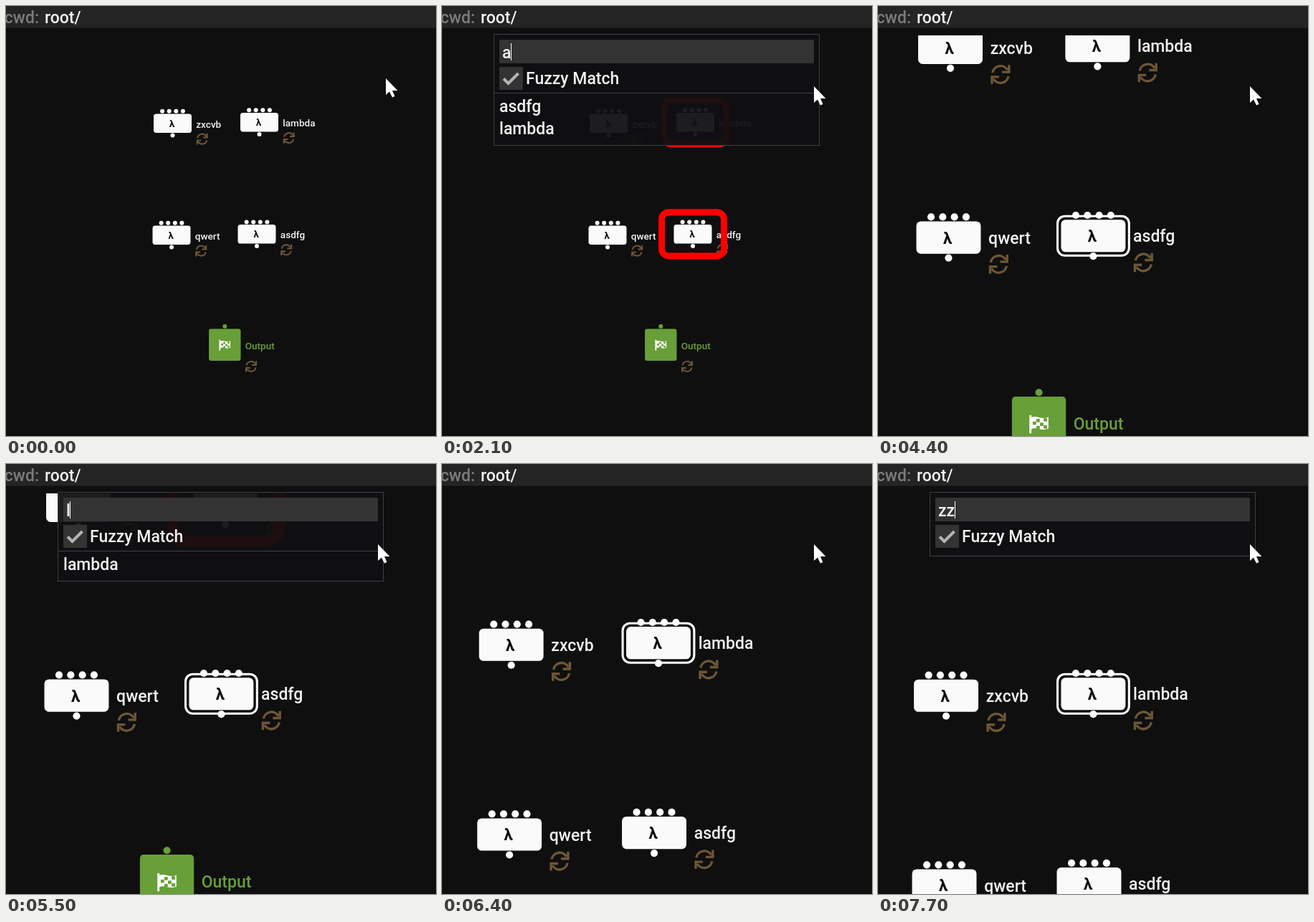
These frames come from a looping animation (600 px wide and 600 px high, 8 s). An HTML page:

```html
<!DOCTYPE html>
<html lang="en">
<head>
<meta charset="utf-8">
<title>Node search</title>
<style>
  html, body { margin: 0; width: 100%; height: 100%; overflow: hidden; background: #0f0f0f; }
  svg { display: block; width: 100vw; height: 100vh; }
  text { font: 500 23px Roboto, sans-serif; fill: #f2f2f2; }
  .label { font-size: 13.55px; }
  .lambda { font-size: 13px; font-weight: 700; fill: #0a0a0a; text-anchor: middle; }
</style>
</head>
<body>
<svg viewBox="0 0 600 600">
  <defs>
    <clipPath id="canvas"><rect y="41" width="600" height="559"/></clipPath>
    <path id="half" d="M-6.5-1.5A6.6 6.6 0 0 1 5.7-3.7M7-7.8V-2H1.2"/>
    <g id="sync" fill="none" stroke="#6e5736" stroke-width="2">
      <use href="#half"/><use href="#half" transform="rotate(180)"/>
    </g>
  </defs>
  <rect width="600" height="600" fill="#0f0f0f"/>
  <rect width="600" height="30.5" fill="#242424"/>
  <text x="46" y="23.5" text-anchor="end" style="fill:#7c7c7c">cwd:</text>
  <text x="54" y="23.5">root/</text>
  <g clip-path="url(#canvas)"><g id="graph"></g></g>
  <g id="dialog">
    <rect id="panel" x="72.5" y="39.5" width="454" fill="#0f0f11" fill-opacity=".94" stroke="#3e3e47"/>
    <rect x="80" y="47" width="439" height="33" fill="#333"/>
    <text id="query" x="84" y="73"></text>
    <path id="caret" d="M0 52V76" stroke="#fff"/>
    <rect x="80" y="85" width="33" height="32" fill="#333"/>
    <path d="M86 101.5L92.5 108L106.5 94" fill="none" stroke="#b4b4b4" stroke-width="4"/>
    <text x="117" y="109">Fuzzy Match</text>
    <path id="rule" d="M73 121.5H526" stroke="#3e3e47"/>
    <text id="hit0" x="80" y="148"></text>
    <text id="hit1" x="80" y="179"></text>
  </g>
  <path id="pointer" d="M0 0V23L5 18.5L9 26.5L12.5 25L9 17H16.5Z" fill="#fff"/>
</svg>
<script>
const $ = id => document.getElementById(id);
const LOOP = 8000, STEP = 100;
const green = '#689f38';

const nodes = {
  zxcvb: [232.5, 163.7],
  lambda: [353.5, 162.2],
  qwert: [231, 319.7],
  asdfg: [350, 318.3]
};

const dot = (x, y, fill = '#fff') => `<circle cx="${x}" cy="${y}" r="3" fill="${fill}"/>`;

const frame = (id, w, h, r, color, width) =>
  `<rect id="${id}" x="${-w}" y="${-h}" width="${2 * w}" height="${2 * h}" rx="${r}"
    fill="none" stroke="${color}" stroke-width="${width}"/>`;

const nodeMarkup = ([name, [x, y]]) => `<g transform="translate(${x} ${y})">
  ${frame('pick-' + name, 29.4, 16.2, 6, '#fff', 1.8)}
  <rect x="-26.5" y="-13.3" width="53" height="26.6" rx="3.7" fill="#fafafa"/>
  ${[-14.4, -4.8, 4.8, 14.4].map(dx => dot(dx, -16.9)).join('')}${dot(0, 16.8)}
  <text class="lambda" x="-.9" y="5">λ</text>
  <text class="label" x="32.8">${name}</text>
  <use href="#sync" x="41.2" y="21.9"/>
  ${frame('mark-' + name, 43.5, 30.5, 10, '#f00', 9)}
</g>`;

function flagMarkup() {
  let cells = '';
  for (let row = 0; row < 3; row++)
    for (let col = 0; col < 4; col++)
      if ((row + col) % 2) {
        const sag = [0, .7, .9, .2][col];
        cells += `<rect x="${-5.1 + col * 3}" y="${-4.6 + row * 2.9 + sag}" width="2.8" height="2.7" fill="${green}"/>`;
      }
  return `<path d="M-7-7V8" stroke="#fff" stroke-width="1.7"/>
    <path d="M-6.4-5.2C-2-7.4 2-2.6 7.8-5.4V4C2 6.8-2 2.2-6.4 4.6Z" fill="#fff"/>${cells}`;
}

const outputMarkup = `<g transform="translate(305.3 472.7)">
  <rect x="-22.2" y="-22.2" width="44.4" height="44.4" rx="3" fill="${green}"/>
  ${dot(0, -25.6, green)}${flagMarkup()}
  <text class="label" x="28.4" style="fill:${green}">Output</text>
  <use href="#sync" x="36.7" y="30.3"/>
</g>`;

$('graph').innerHTML = Object.entries(nodes).map(nodeMarkup).join('') + outputMarkup;
const labels = document.querySelectorAll('.label');

// Search box over time: start, query (null = closed), matches, marked node shown as selected
const phases = [
  [0, null, []],
  [1100, '', []],
  [2100, 'a', ['asdfg', 'lambda']],
  [2900, 'as', ['asdfg']],
  [3900, 'as', ['asdfg'], 'asdfg'],
  [4000, null, [], 'asdfg'],
  [5200, '', [], 'asdfg'],
  [5500, 'l', ['lambda'], 'asdfg'],
  [5600, 'la', ['lambda'], 'asdfg'],
  [5800, 'lam', ['lambda'], 'asdfg'],
  [6200, null, [], 'lambda'],
  [7000, '', [], 'lambda'],
  [7500, 'z', ['zxcvb'], 'lambda'],
  [7600, 'zz', [], 'lambda']
];

const focus = (name, s = 1.697) => [s, 300.4 - nodes[name][0] * s, 320.7 - nodes[name][1] * s];
const views = [[1, 0, 0], focus('asdfg'), focus('lambda')];

const clamp = u => Math.min(1, Math.max(0, u));
const mix = (a, b, u) => a.map((v, i) => v + (b[i] - v) * u);
const ease = u => u < .5 ? 2 * u * u : 1 - 2 * (1 - u) ** 2;
const glide = (t, start) => ease(clamp((t - start) / 366));
const show = (id, on) => { $(id).style.display = on ? '' : 'none'; };

function drawGraph(t, hits, picked, confirmed) {
  const first = mix(views[0], views[1], glide(t, 3968));
  const [s, x, y] = mix(first, views[2], glide(t, 6168));
  $('graph').setAttribute('transform', `translate(${x} ${y}) scale(${s})`);
  labels.forEach(el => el.setAttribute('y', 5.1 + (1.697 - s) * 1.5));
  for (const name in nodes) {
    show('pick-' + name, name === picked);
    show('mark-' + name, hits.includes(name) && !confirmed);
  }
}

function drawDialog(query, hits, confirmed) {
  show('dialog', query !== null);
  if (query === null) return;
  $('query').textContent = query;
  const end = 84 + $('query').getComputedTextLength();
  $('caret').setAttribute('transform', `translate(${Math.floor(end) + .5} 0)`);
  show('caret', !confirmed);
  show('rule', hits.length);
  $('panel').setAttribute('height', hits.length ? 93 + 31 * hits.length : 89);
  [0, 1].forEach(i => { $('hit' + i).textContent = hits[i] || ''; });
}

function draw(t) {
  const [start, query, hits, picked] = phases.filter(p => p[0] <= t).pop();
  const confirmed = start === 3900;
  drawGraph(t, hits, picked, confirmed);
  drawDialog(query, hits, confirmed);
  const [px, py] = mix([530, 101], [519, 112], clamp(t / 400));
  $('pointer').setAttribute('transform', `translate(${px} ${py})`);
}

const origin = performance.now();
function tick() {
  const t = Math.max(0, performance.now() - origin) % LOOP;
  draw(Math.floor(t / STEP) * STEP);
  requestAnimationFrame(tick);
}
draw(0);
tick();
</script>
</body>
</html>
```
